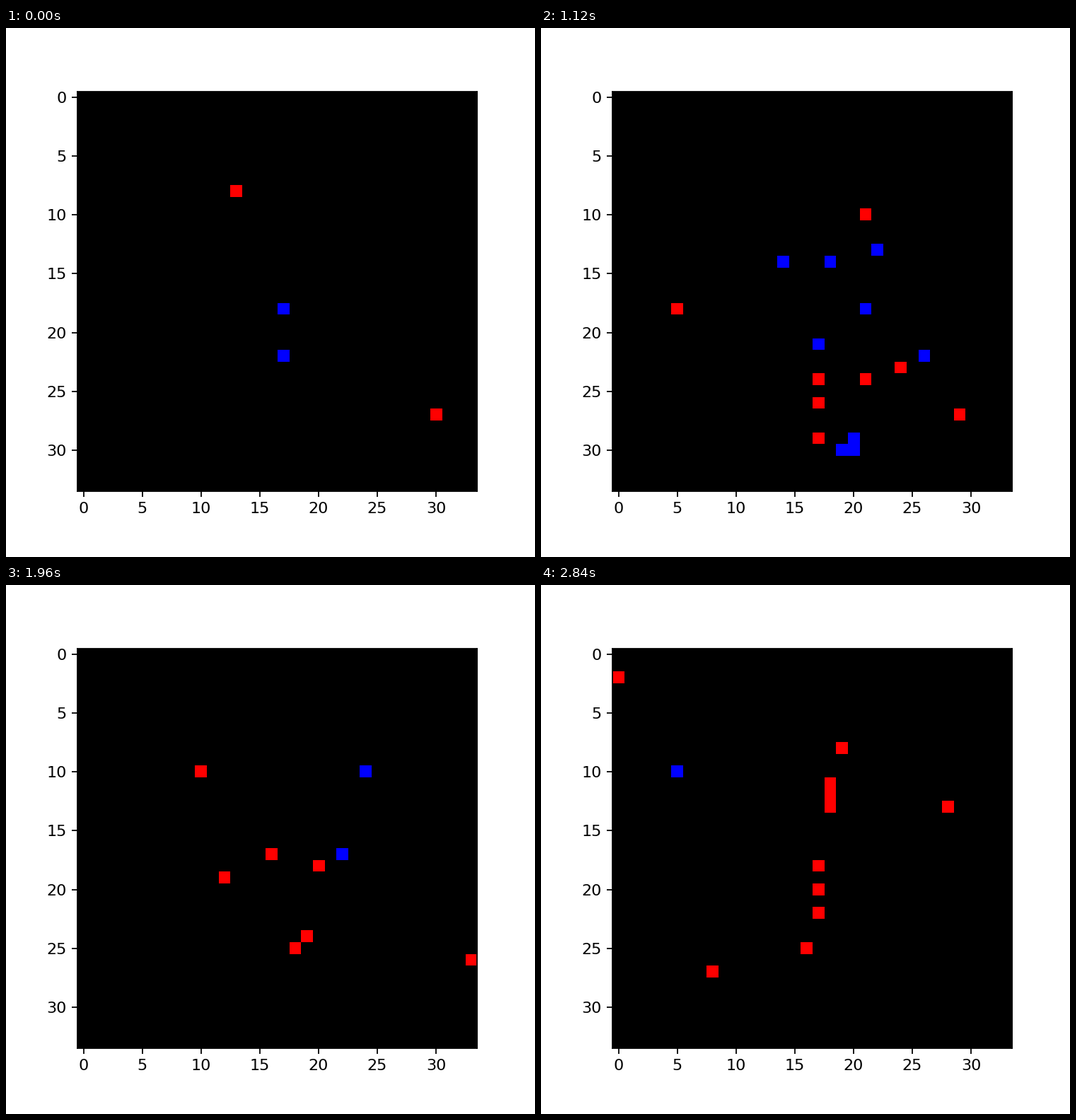
These frames come from a looping animation (748 px wide and 748 px high, 2.88 s). A matplotlib script:

```python
import numpy as np
import matplotlib.pyplot as plt
from matplotlib.animation import FuncAnimation

SIZE, DPI = 748, 160
N, FRAMES, STEP = 34, 72, 40

# Strokes of a crossed seven: top bar with stem, then the cross bar.
STROKES = [
    [(7.3, 14.7), (16, 13.7), (20, 13), (18.6, 17), (17.6, 21),
     (16.8, 28), (16.4, 30.5)],
    [(13.2, 21.8), (23.3, 20.8)],
]
RADIUS, SOFT = 1.3, 0.45
GAIN, NOISE = 13, 1.4

gy, gx = np.mgrid[0:N, 0:N].astype(float)


def ramp(t, mid, width):
    return 1 / (1 + np.exp(-(t - mid) / width))


def offset(t):
    """Three saccades: down-right, up-right, then back left."""
    dx = -1.4 + 2.5 * ramp(t, 15, 4) + 2.9 * ramp(t, 39, 4) - 5.4 * ramp(t, 61, 2.5)
    dy = -5.2 + 6 * ramp(t, 12.5, 2.2) - 6 * ramp(t, 36, 1.8)
    return dx, dy


def distance(x, y, a, b):
    ux, uy = b[0] - a[0], b[1] - a[1]
    k = np.clip(((x - a[0]) * ux + (y - a[1]) * uy) / (ux * ux + uy * uy), 0, 1)
    return np.hypot(x - a[0] - k * ux, y - a[1] - k * uy)


def brightness(t):
    dx, dy = offset(t)
    x, y = gx - dx, gy - dy
    d = np.min([distance(x, y, a, b)
                for s in STROKES for a, b in zip(s, s[1:])], axis=0)
    return 1 / (1 + np.exp((d - RADIUS) / SOFT))


def events(n):
    """Event-camera picture: blue where it brightens, red where it dims."""
    rng = np.random.default_rng(100 + n)
    change = brightness(n + 0.5) - brightness(n - 0.5)
    fired = (GAIN * np.abs(change)) ** 1.5 > rng.random((N, N))
    img = np.zeros((N, N, 3), np.uint8)
    img[fired & (change < 0), 0] = 255
    img[fired & (change > 0), 2] = 255
    for _ in range(rng.poisson(NOISE)):
        row, col = rng.integers(0, N, 2)
        img[row, col, 0] = 255
    return img


fig = plt.figure(figsize=((SIZE + 0.01) / DPI,) * 2, dpi=DPI, facecolor="white")
left, top, side = 101.2, 89.9, 565.0
ax = fig.add_axes([left / SIZE, 1 - (top + side) / SIZE, side / SIZE, side / SIZE])
picture = ax.imshow(events(0), interpolation="nearest")
ax.set_xticks(range(0, N, 5))
ax.set_yticks(range(0, N, 5))
for label in ax.get_xticklabels() + ax.get_yticklabels():
    label.set_family("DejaVu Sans")
    label.set_size(10)


def draw(n):
    picture.set_data(events(n))
    return [picture]


anim = FuncAnimation(fig, draw, frames=FRAMES, interval=STEP,
                     repeat=True, repeat_delay=0, blit=False)
plt.show()
```
